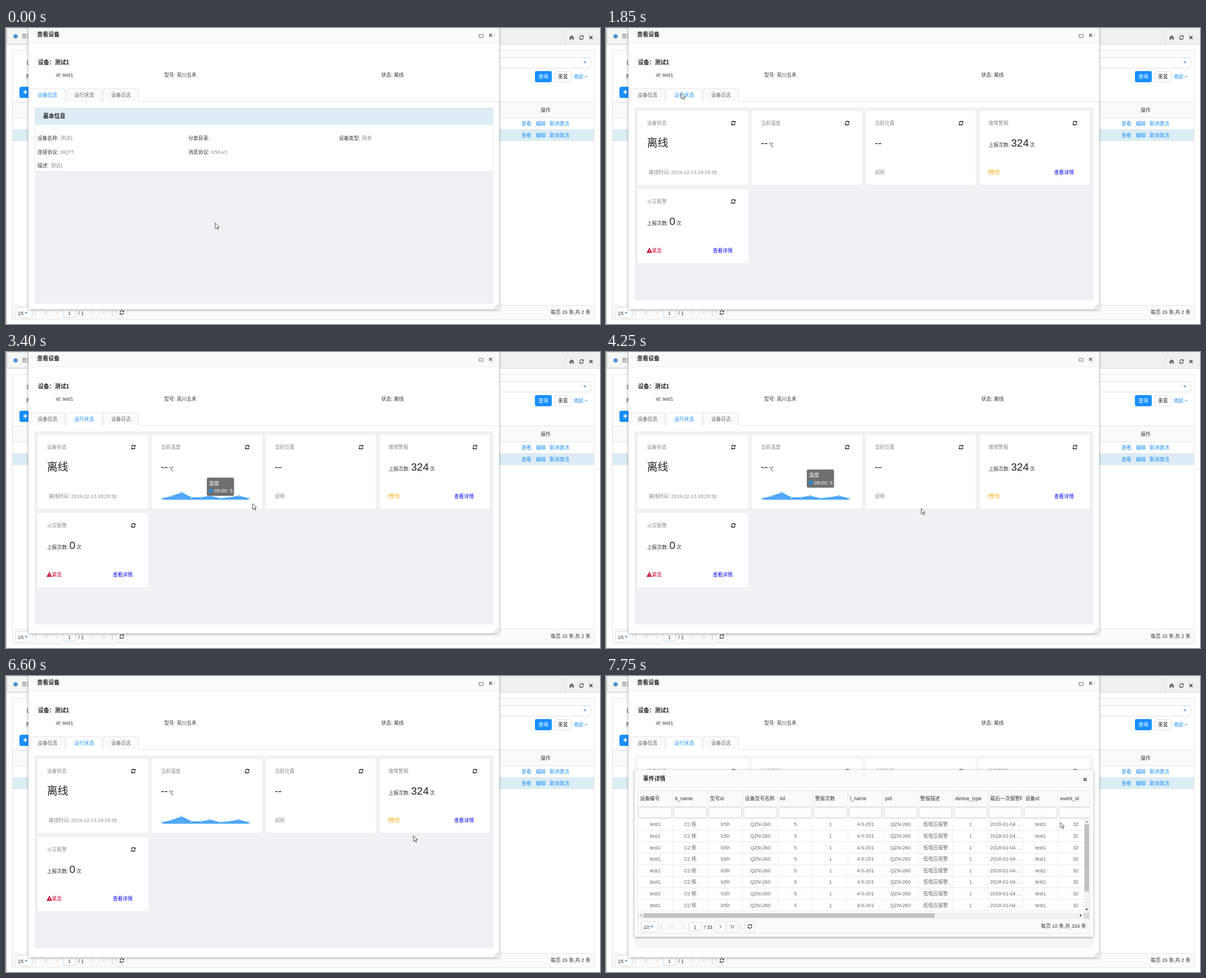
An HTML page for the animation above (8 s loop, 1059 by 529 pixels).

```html
<!DOCTYPE html>
<html lang="zh-CN">
<head>
<meta charset="utf-8">
<title>设备</title>
<style>
html, body { margin: 0; width: 100%; height: 100%; overflow: hidden; background: #fff; }
#stage { display: block; width: 100vw; height: 100vh; }
text { font-family: "Liberation Sans", "Noto Sans CJK SC", "Noto Sans CJK", sans-serif; white-space: pre; }
</style>
</head>
<body>
<svg id="stage" viewBox="0 0 1059 529" xmlns="http://www.w3.org/2000/svg"></svg>
<script>
const BLUE = '#1890ff', DARK = '#333', GREY = '#888', LINE = '#e4e4e4', PANEL = '#f0f1f5';
const LOOP = 8000, STEP = 50;

// y is the middle of the glyphs
const text = (x, y, s, fill = DARK, size = 8.8, extra = '') =>
  `<text x="${x}" y="${y + size * .36}" fill="${fill}" font-size="${size}" ${extra}>${s}</text>`;
const mid = 'text-anchor="middle"', bold = 'font-weight="bold"';
const rect = (x, y, w, h, fill, stroke = 'none', r = 0, extra = '') => {
  const o = stroke === 'none' ? 0 : .5;
  return `<rect x="${x + o}" y="${y + o}" width="${w - 2 * o}" height="${h - 2 * o}" rx="${r}" fill="${fill}" stroke="${stroke}" ${extra}/>`;
};
const path = (d, stroke = 'none', fill = 'none', w = 1, extra = '') =>
  `<path d="${d}" stroke="${stroke}" fill="${fill}" stroke-width="${w}" ${extra}/>`;
const hline = (x, y, w, c = LINE) => rect(x, y, w, 1, c);
const vline = (x, y, h, c = LINE) => rect(x, y, 1, h, c);
const group = (id, body, extra = '') => `<g id="${id}" ${extra}>${body}</g>`;
const clipped = (x, y, w, h, body) =>
  `<svg x="${x}" y="${y}" width="${w}" height="${h}" viewBox="${x} ${y} ${w} ${h}">${body}</svg>`;

const caret = (x, y, c = '#5a9fd8') => path(`M${x - 3} ${y - 1.5}h6l-3 3.2z`, 'none', c);
const cross = (x, y, c = '#666', r = 2.6) =>
  path(`M${x - r} ${y - r}l${2 * r} ${2 * r}m0 ${-2 * r}l${-2 * r} ${2 * r}`, c, 'none', 1.9);
const refresh = (x, y, c = '#222') => `<g transform="translate(${x} ${y})">` +
  path('M-3.3-.6A3.3 3.3 0 0 1 2.5-2.2M3.3.6A3.3 3.3 0 0 1-2.5 2.2', c, 'none', 1.4) +
  path('M4-4V-.7H.7ZM-4 4V.7H-.7Z', 'none', c) + '</g>';
const chevrons = (x, y, dir, n, c) => {
  let d = '';
  for (let i = 0; i < n; i++) d += `M${x - dir * 1.6 + (i - (n - 1) / 2) * 3.6} ${y - 3.2}l${dir * 3.2} 3.2l${-dir * 3.2} 3.2`;
  return path(d, c, 'none', 1);
};

function pager(x, y, size, pages, active, shift) {
  const next = active ? '#444' : '#ccc', right = x + shift;
  const button = cx => rect(cx - 10, y - 10, 20, 20, '#fff', '#ddd', 3);
  return rect(x, y - 10, 31, 20, '#fff', '#ddd', 3) + text(x + 5, y + .5, size, DARK, 9.5) + caret(x + 20, y) +
    vline(x + 36, y - 5, 11, '#ccc') +
    chevrons(x + 55, y, -1, 2, '#ccc') + chevrons(x + 76, y, -1, 1, '#ccc') +
    rect(x + 85, y - 8, 24, 16, '#fff', '#c5d9e8', 2) + text(x + 97, y + .5, 1, DARK, 8.8, mid) +
    text(x + 113, y + .5, '/ ' + pages) +
    (active ? button(right + 138) + button(right + 159) : '') +
    chevrons(right + 138, y, 1, 1, next) + chevrons(right + 159, y, 1, 2, next) +
    vline(right + 173, y - 5, 11, '#ccc') + button(right + 190.5) + refresh(right + 190.5, y - .5, '#444');
}

function page() {
  const links = y => text(919, y, '查看', BLUE) + text(944.5, y, '编辑', BLUE) + text(969, y, '取消激活', BLUE);
  return rect(0, 0, 1059, 529, '#fff') +
    rect(0, 0, 1059, 30, '#f0f0f0') + hline(0, 29, 1059, '#ddd') + vline(0, 0, 529, '#aaa') +
    rect(2, 0, 60, 29, '#f6f6f6', '#ddd') + '<circle cx="17" cy="15" r="3.8" fill="#4a90d9"/>' + text(28, 15, '首页', '#666') +
    vline(996, 5, 24, '#ddd') +
    path('M1003.5 17.5l5-4.5 5 4.5h-1.4v3.5h-2.5v-2.7h-2.2v2.7h-2.5v-3.5z', 'none', '#666') +
    refresh(1026, 17, '#555') + cross(1043, 17, '#555') +
    rect(11, 40, 1038, 482, '#fff', LINE) +
    text(36, 61.5, '设备') + text(36, 86.5, '所属') +
    rect(800, 52, 243, 20, '#fff', '#ddd', 3) + caret(1032, 61.5) +
    rect(943, 77, 30, 20, BLUE, 'none', 3) + text(958, 87, '查询', '#fff', 8.8, mid) +
    rect(978, 77, 30, 20, '#fff', '#ddd', 3) + text(993, 87, '重置', DARK, 8.8, mid) +
    text(1012, 86.5, '收起', BLUE) + path('M1032 88l2.3-2.3 2.3 2.3', BLUE) +
    rect(24, 105, 40, 20, BLUE, 'none', 3) + path('M31 114.5h7m-3.5-3.5v7', '#fff', 'none', 2) +
    rect(11, 132, 1038, 29, '#fafafa', LINE) + text(962, 146.5, '操作', DARK, 8.8, mid) +
    rect(12, 181, 1036, 21, '#dcecf5') + hline(12, 181, 1036, '#e0e8ee') + links(171) + links(192) +
    rect(11, 495, 1038, 27, '#fafafa', LINE) +
    pager(16, 509, 15, 1, false, 0) + text(1042, 508, '每页 15 条,共 2 条', DARK, 8.8, 'text-anchor="end"');
}

function dialog() {
  let dots = '';
  for (let i = 0; i < 3; i++) for (let j = 0; j <= i; j++) dots += rect(876 - 3 * j, 494 + 3 * i, 1, 1, '#555');
  return rect(40, -10, 839, 512.5, '#fff', 'none', 2, 'filter="url(#shadow)"') +
    rect(40, 0, 839, 26, '#fafafa') + hline(40, 26, 839, '#eee') +
    text(55.5, 11.5, '查看设备', '#222', 10, bold) +
    rect(843, 11, 8, 6, '#fff', '#777') + hline(843, 11, 8, '#777') + cross(864, 13, '#777', 2.5) +
    text(57, 61.5, '设备：测试1', '#222', 10, bold) +
    text(89, 84, 'id: test1') + text(282, 84, '型号: 岚川五禾') + text(669, 84, '状态: 离线') + dots;
}

const TABS = [[42, '设备信息'], [107.5, '运行状态'], [173, '设备日志']];
const tabs = () => hline(40, 131, 839, '#e6e6e6') + TABS.map(([x, s], i) =>
  `<path class="tab" d="M${x} 132V110.5q0-2 2-2h59.500q2 0 2 2V132" stroke="#e4e4e4"/>` +
  text(x + 14.5, 120, s, '#666', 8.8, 'class="tabname"')).join('');

function info() {
  const field = (x, y, label, value = '', dx = 41) => text(x, y, label + ':') + text(x + dx, y, value, GREY);
  return rect(51, 142, 818, 351, PANEL) + rect(51, 142, 818, 115, '#fff', '#e6e6e6') +
    rect(51, 142, 818, 31, '#deecf6') + text(66, 157, '基本信息', '#222', 10, bold) +
    field(56, 197, '设备名称', '测试1') + field(325, 197, '分类目录') + field(593.5, 197, '设备类型', '网关') +
    field(56, 221.5, '连接协议', 'MQTT') + field(325, 221.5, '消息协议', 'lc5h-v2') +
    field(56, 246, '描述', '测试1', 23.5);
}

const TEMPS = [262, 258, 251.8, 260.5, 260.5, 257.5, 262, 260.5, 257.5, 262];
const tempPoints = TEMPS.map((y, i) => [279.5 + 16.95 * i, y]);

function cards() {
  const card = (x, y, title) => rect(x, y, 196.5, 132, '#fff') +
    text(x + 16, y + 22, title, GREY) + refresh(x + 170, y + 22);
  const count = (x, y, n, after) => text(x, y, '上报次数:') + text(x + 40, y - 3, n, '#222', 19) + text(after, y, '次');
  const curve = 'M' + tempPoints.map(p => p.join(' ')).join('L');
  return rect(51, 142, 818, 345, PANEL) +
    card(57, 148, '设备状态') + text(73, 205.5, '离线', '#222', 19) + text(76, 257.5, '离线时间: 2019-12-13 18:29:30', GREY) +
    card(260, 148, '当前温度') + text(276, 205, '--', '#222', 19) + text(290.5, 208.5, '℃') +
    group('chart', `<clipPath id="wipe"><rect id="wipeBox" x="276" y="245" height="25"/></clipPath><g clip-path="url(#wipe)">` +
      path(curve + 'V264H279.5Z', 'none', '#52a9f8') + path(curve, BLUE, 'none', 1.2) + '</g>' +
      tempPoints.map(([x, y]) => `<circle class="dot" cx="${x}" cy="${y}" fill="#fff" stroke="${BLUE}"/>`).join('')) +
    card(463, 148, '当前位置') + text(479, 205, '--', '#222', 19) + text(479, 257.5, '说明', GREY) +
    card(666, 148, '故障警报') + count(682, 208.5, 324, 755.5) +
    path('M682.3 253.700h2.200l-.4 5h-1.400zM682.5 259.500h1.800v1.800h-1.800z', 'none', '#faad14') +
    rect(685, 253, 18, 9.5, '#3390ff', 'none', 0, 'id="mark"') + text(685, 257.5, '警告', '#faad14', 8.8, 'id="warning"') +
    text(799, 257.5, '查看详情', '#00f', 8.8, 'id="detail"') +
    card(57, 288, '火灾报警') + count(73, 348.5, 0, 125.5) +
    path('M77.3 393l4.500 8.500h-9z', '#c8002d', '#c8002d', .6) + path('M77.3 395.600v3m0 .8v1.200', '#fff', 'none', 1.1) +
    text(82, 397.5, '紧急', '#c8002d') + text(190.5, 397.5, '查看详情', '#00f');
}

const COLUMNS = [
  ['设备编号', 'test1'], ['b_name', 'C2 栋'], ['型号id', 'lc5h'], ['设备型号名称', 'QZN-260'], ['lid', 5],
  ['警报次数', 1], ['l_name', '4-5-201'], ['pid', 'QZN-260'], ['警报描述', '低电压报警'], ['device_type', 1],
  ['最后一次报警时间', '2018-01-04 ...'], ['设备Id', 'test1'], ['event_id', 32]];

function popup() {
  const colW = 62.45, rowH = 20.6;
  let head = '', rows = '';
  COLUMNS.forEach(([name, value], i) => {
    const x = 57 + colW * i;
    head += clipped(x, 205, colW - 2.5, 28, text(x + 3.5, 219, name)) + vline(x + colW - 1, 205, 50, '#e8e8e8') +
      rect(x + 1, 234, colW - 3, 20, '#fff', '#d4d4d4', 3);
    rows += vline(x + colW - 1, 255, 168, '#eee');
    for (let r = 0; r < 8; r++) rows += text(x + colW / 2 - .3, 265.3 + r * rowH, value, '#666', 8.8, mid);
  });
  for (let r = 1; r <= 8; r++) rows += hline(57, 254.5 + r * rowH, 795, '#e6e6e6');
  return rect(51, 142, 818, 345, '#fff', 'none', 0, 'opacity=".35"') +
    rect(51, 168, 817.5, 298, '#fff', 'none', 2, 'filter="url(#shadow)"') +
    rect(51, 168, 817.5, 30, '#fafafa') + hline(51, 198, 817, '#eee') +
    text(66, 183.5, '事件详情', '#222', 10, bold) + cross(854, 185, '#555', 2.6) +
    rect(56, 204, 807, 257, '#fff', LINE) + rect(57, 205, 805, 28, '#fafafa') + hline(57, 233, 805, '#e8e8e8') +
    clipped(57, 205, 805, 50, head) + hline(57, 254, 805, '#e8e8e8') +
    group('rows', clipped(57, 255, 795, 168, rows) +
      rect(852, 255, 10, 168, '#f1f1f1') + rect(853, 265, 8, 120, '#c1c1c1') +
      path('M854.5 262l2.500-3 2.500 3z', 'none', '#999') + path('M854.5 416l2.500 3 2.500-3z', 'none', '#444')) +
    rect(57, 423, 805, 11, '#f1f1f1') + rect(67, 424, 519, 8, '#c1c1c1') + rect(852, 423, 10, 11, '#dcdcdc') +
    path('M63.500 425.500l-2.500 2.500 2.500 2.500z', 'none', '#999') + path('M845 425.500l3 2.500-3 2.500z', 'none', '#444') +
    rect(57, 434, 805, 26, '#fafafa') + pager(62, 448, 10, 33, true, 4) +
    text(856, 447, '每页 10 条,共 324 条', DARK, 8.8, 'text-anchor="end"');
}

const tooltip = () => rect(0, 0, 48.5, 32.5, 'rgba(50,50,50,.7)', 'none', 2.5) + text(3.5, 10, '温度', '#fff', 9.2) +
  `<circle cx="7" cy="23.500" r="3.300" fill="${BLUE}"/>` + text(12.8, 23.2, '', '#fff', 9.2, 'id="reading"');

document.getElementById('stage').innerHTML =
  '<filter id="shadow" x="-5%" y="-5%" width="110%" height="110%"><feDropShadow dx="0" dy="1" stdDeviation="2.500" flood-color="#000" flood-opacity=".4"/></filter>' +
  page() + dialog() + tabs() + group('info', info()) + group('cards', cards()) + group('tooltip', tooltip()) + group('popup', popup()) +
  group('arrow', path('M0 .5V10.500L2.500 8.300 4.200 12 5.800 11.300 4.200 7.700H7.200Z', '#222', '#fff', .8)) +
  group('beam', path('M-1.800-4.500h3.600M0-4.500v9M-1.800 4.500h3.600', '#222', 'none', 1));

const $ = id => document.getElementById(id);
const all = c => [...document.querySelectorAll('.' + c)];
const tabBoxes = all('tab'), tabNames = all('tabname'), dots = all('dot');
const show = (id, on) => $(id).style.display = on ? '' : 'none';
const place = (id, x, y) => $(id).setAttribute('transform', `translate(${x} ${y})`);
const ramp = (t, from, to) => Math.min(1, Math.max(0, (t - from) / (to - from)));

// time, x, y of the pointer
const POINTER = [
  [200, 373, 348], [950, 133, 115], [1450, 133, 115], [1500, 134, 116], [2500, 134, 116], [2900, 450, 299], [3100, 490, 276],
  [3150, 490, 276], [3600, 399, 266], [3850, 399, 266], [4050, 420, 256], [4250, 562, 279], [4450, 680, 307], [4700, 782, 263],
  [5100, 810, 261], [5200, 810, 261], [5550, 697, 258], [6150, 697, 258], [6250, 716, 288], [6550, 716, 288], [7000, 810, 261]];

function pointerAt(t) {
  const i = POINTER.findIndex(k => k[0] > t);
  if (i < 0) return POINTER[POINTER.length - 1].slice(1);
  if (i === 0) return POINTER[0].slice(1);
  const a = POINTER[i - 1], b = POINTER[i], k = ramp(t, a[0], b[0]);
  return [a[1] + (b[1] - a[1]) * k, a[2] + (b[2] - a[2]) * k];
}

function render(t) {
  const [x, y] = pointerAt(t);
  const over = (x0, y0, x1, y1) => x >= x0 && x <= x1 && y >= y0 && y <= y1;
  const active = t < 1500 ? 0 : 1;

  tabBoxes.forEach((box, i) => {
    const on = i === active, hover = over(TABS[i][0], 108, TABS[i][0] + 63, 132);
    box.setAttribute('fill', on ? '#fff' : '#fafafa');
    tabNames[i].setAttribute('fill', on ? BLUE : hover ? '#40a9ff' : '#666');
  });
  show('info', active === 0);
  show('cards', active === 1);
  $('cards').style.opacity = ramp(t, 1450, 1650);

  const grown = ramp(t, 2050, 3050);
  show('chart', t > 2050);
  $('wipeBox').setAttribute('width', 3 + 153 * grown + (grown === 1 ? 6 : 0));
  dots.forEach(d => {
    d.setAttribute('r', 1.6 * grown);
    d.setAttribute('stroke-width', .9 * Math.sqrt(grown));
  });

  // the tooltip follows the pointer inside the chart and lingers after it
  const tipX = Math.min(420, x), inside = t < 4050;
  show('tooltip', t >= 3400 && t < 4300);
  place('tooltip', tipX - 62, (inside ? y : 256) - 46);
  $('reading').textContent = tipX < 407 ? '08:00: 3' : '09:00: 5';

  const selected = t >= 6000 && t < 6450;
  show('mark', selected);
  $('warning').setAttribute('fill', selected ? '#fff' : '#faad14');
  const hot = over(798, 252, 835, 264);
  $('detail').setAttribute('fill', hot ? '#80607c' : '#00f');
  $('detail').setAttribute('text-decoration', hot ? 'underline' : 'none');

  show('popup', t >= 7550);
  $('popup').style.opacity = ramp(t, 7500, 7700);
  show('rows', t >= 7750);

  const beam = active === 1 && over(680, 252, 704, 263);
  show('beam', beam);
  show('arrow', !beam);
  place('beam', x, y);
  place('arrow', x, y);
}

const start = performance.now();
function tick() {
  const t = (performance.now() - start) % LOOP;
  render(Math.floor(t / STEP) * STEP);
  requestAnimationFrame(tick);
}
tick();
</script>
</body>
</html>
```
